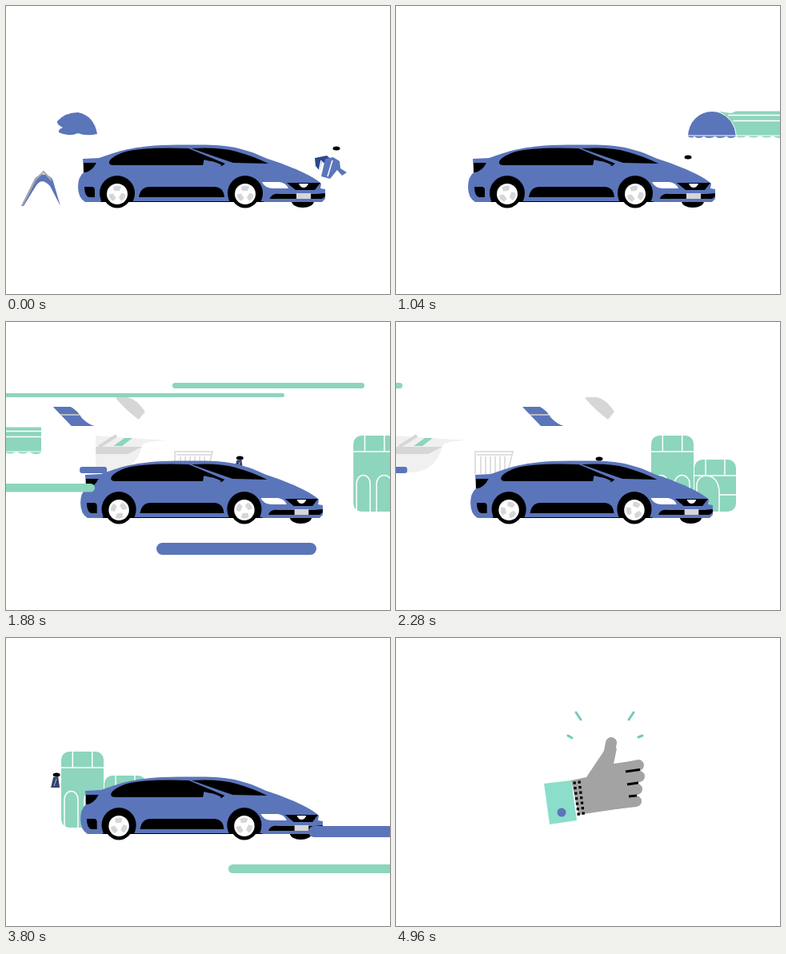
Recreate the animation shown at these times as an HTML page with a canvas. Size 480x360 px, loop 5 s.

```html
<!DOCTYPE html>
<html lang="en">
<head>
<meta charset="utf-8">
<style>
html, body { margin: 0; width: 100%; height: 100%; overflow: hidden; background: #fff; }
canvas { display: block; }
</style>
</head>
<body>
<canvas id="stage" width="480" height="360"></canvas>
<script>
const c = document.getElementById('stage').getContext('2d');
const LOOP = 5000, FRAME = 40;
const BLUE = '#5b75ba', GREEN = '#8dd5bd', MINT = '#8bdec9', SKIN = '#a3a3a3';
const GREY = '#d6d6d6', PALE = '#f0f0f0', WHITE = '#fff', BLACK = '#000';

const clamp = v => Math.max(0, Math.min(1, v));
const ease = v => v * v * (3 - 2 * v);
const mix = (a, b, k) => a + (b - a) * k;

// Linear track through time, value pairs
function track(t, ...p) {
  let i = 0;
  while (i < p.length - 4 && t > p[i + 2]) i += 2;
  return mix(p[i + 1], p[i + 3], clamp((t - p[i]) / (p[i + 2] - p[i])));
}
function fill(d, color) { c.fillStyle = color; c.fill(new Path2D(d)); }
function line(d, color, w, cap = 'butt') {
  c.strokeStyle = color; c.lineWidth = w; c.lineCap = cap; c.stroke(new Path2D(d));
}
function disc(x, y, rx, color, ry = rx) {
  c.fillStyle = color; c.beginPath(); c.ellipse(x, y, rx, ry, 0, 0, 7); c.fill();
}
function bar(x1, y1, x2, y2, color, r = (y2 - y1) / 2) {
  c.fillStyle = color; c.beginPath(); c.roundRect(x1, y1, x2 - x1, y2 - y1, r); c.fill();
}
function group(x, y, draw) { c.save(); c.translate(x, y); draw(); c.restore(); }
function clipped(x, y, w, h, draw) {
  c.save(); c.beginPath(); c.rect(x, y, w, h); c.clip(); draw(); c.restore();
}

function wheel(x, t) {
  clipped(x - 24, 205, 48, 40, () => disc(x, 234, 22, BLACK));
  disc(x, 235, 17.5, BLACK);
  disc(x, 235, 13, WHITE);
  group(x, 235, () => {
    c.rotate(t / 260);
    for (let i = 0; i < 3; i++) {
      c.rotate(Math.PI * 2 / 3);
      fill('M-4 -4L-5 -9Q0 -12 5 -9L3 -4Z', GREY);
    }
  });
}

function car(t) {
  const squeeze = track(t, 1040, 1, 1560, .98);
  c.save();
  c.translate(245, 0); c.scale(squeeze, 1); c.translate(-245, 0);
  disc(371, 244, 14, BLACK, 8);
  fill('M96 191L116 190C138 183 155 174 215 173.5H250C285 174 305 181 327 191C355 200 384 212 394 222L393 228L399 229V241L395 245H99Q90 240 90 226Q90 214 97 208Z', BLUE);
  fill('M129 195Q130 189 148 182.5Q172 176 228 178L274 197L270 200L248 192L246 199H135Q128 199 129 195Z', BLACK);
  const screen = 'M232 178Q268 176 288 182Q310 188 328 197L284 196Q260 188 232 178Z';
  fill(screen, t > 1400 && t < 1720 ? WHITE : BLACK);
  fill('M247 193Q260 193 270 199H247Z', BLUE);
  fill('M97 196H113Q108 206 99 208H97Z', BLACK);
  fill('M98 226H107Q111 226 111 230V239H104Q98 238 98 226Z', BLACK);
  fill('M166 239Q168 226 180 226H262Q272 227 273 239Z', BLACK);
  line('M118 244.5H322', BLACK, 1);
  fill('M320 220H342Q350 221 353 228H333Q323 227 320 220Z', WHITE);
  fill('M351 221H393L386 230H362Z', BLACK);
  fill('M366 222H378Q376 227 372 227Q368 227 366 222Z', WHITE);
  fill('M330 240Q333 234 342 235H388L399 234V238L395 241H330Z', BLACK);
  bar(363, 234, 381, 241, GREY, 0);
  wheel(139, t);
  wheel(299, t);
  c.restore();
}

function roadside(t) {
  group(-.173 * t, 0, () => {
    fill('M64 144Q74 133 90 133Q110 137 114 160Q100 163 90 159Q78 164 66 158Q65 154 71 152Q63 148 64 144Z', BLUE);
    fill('M19 250L36 216Q46 205 58 216L68 250L55 225Q45 214 38 224L22 250Z', BLUE);
    line('M20 250L37 217L47 207L57 218', '#aaa', 2);
  });
}

function awning(t) {
  group(track(t, 0, 575, 1560, 305, 1960, -135), 0, () => {
    fill('M10 132L24 134L30 131.5H91V163Q83 168 76 162Q68 167 60 162Q52 167 44 162Q36 167 28 162L0 150Z', GREEN);
    line('M20 136.5H91M26 143.5H91', WHITE, 1.5);
    fill('M-30 163A30 31 0 0 1 30 163Q23 167 18 163Q9 167 4 163Q-5 167 -10 163Q-17 167 -22 163Q-26 166 -30 163Z', BLUE);
    line('M8 132Q29 141 30.5 163M-30 162H91', WHITE, 1);
  });
}

function building(t) {
  group(-1.1 * (t - 1560), 0, () => {
    fill('M-60 100H80L82 107L76 112L80 150L50 155L40 138Q15 130 5 139L-60 135Z', PALE);
    line('M56 100V115M69 100V115M47 115H78V151H47ZM47 124H78M47 133H78M47 142H78M-60 100H78', GREY, 1);
  });
}

function walker(x, y, body) {
  disc(x, y, 4.5, BLACK, 2.5);
  if (body === 'run') group(x - 413, y - 178, () => {
    fill('M386 190L401 187L407 192L401 199L395 194L392 206L387 200Z', '#2c478e');
    fill('M399 191L409 189L417 194L418 203L426 208L420 212L414 205L405 216L394 213Z', BLUE);
    line('M408 193L402 213M394 193L391 208', WHITE, 1.5);
  });
  if (body === 'walk') group(x, y, () => {
    fill('M-4 3L2 2L4 16H-7Z', '#34436d');
    line('M0 5L-3 14', '#bbb', 1);
  });
}

function suitcase(x, y, w, h, details) {
  group(x, y, () => {
    bar(0, 0, w, h, GREEN, 10);
    line(`M${w * .27} 0V20M${w * .73} 0V20M0 20H${w}` + details, WHITE, 1.5);
  });
}

function airport(t) {
  group(track(t, 1720, 157, 2840, -157), 0, () => {
    fill('M0 142L58 146L91 148Q56 149 58 156Q48 188 18 188H0Z', PALE);
    fill('M0 156H58L40 165H0Z', GREY);
    line('M4 156L26 142', GREY, 4);
    fill('M22 155L36 145H46L33 155Z', GREEN);
    bar(-20, 181, 14, 189, BLUE, 3);
    line('M99 190V162H146L139 190M101 166H144M106 168V190M112 168V190M118 168V190M124 168V190M130 168V190M136 168V186', GREY, 1.5);
  });
  const x = track(t, 1720, 319, 1721, 480, 2280, 319, 3120, 181, 4280, -10, 4900, -120);
  suitcase(x, 142, 53, 95, 'M4 95V60A8 10 0 0 1 21 60V95M29 95V60A9 10 0 0 1 48 60V95');
  suitcase(x + 54, 172, 52, 65, 'M0 44H3V30Q5 20 16 20Q30 22 31 40V65M31 44H52');
}

function plane(t) {
  group(.248 * (t - 2280), 0, () => {
    fill('M158 106H180Q188 110 194 120Q202 128 210 130H181Z', BLUE);
    line('M167 116H191', '#d8d5c8', 1.5);
    group(237, 94, () => {
      const s = track(t, 2280, 1, 3120, .27);
      c.scale(s, s);
      fill('M0 0H14Q25 2 36 18L28 28Q12 16 0 2Z', GREY);
    });
  });
}

function firstRush(t) {
  group(-1.1 * (t - 1560), 0, () => {
    bar(97, 154, 346, 166.5, BLUE);
    bar(292, 89, 700, 94, GREEN);
    bar(174, 202, 463, 212.5, GREEN);
    bar(177, 201, 243, 212, WHITE);
    bar(30, 271, 109, 290, BLUE, 9);
    fill('M145 275L149 272H170V282L164 286Q158 280 148 279Z', BLUE);
    bar(70, 239, 122, 242, BLUE);
    bar(560, 76, 800, 83, GREEN);
    bar(540, 276, 740, 291, BLUE);
  });
}

function bands(shift) {
  group(shift, 0, () => {
    fill('M18 105L560 109.5V144H18A19 19.5 0 0 1 18 105Z', BLUE);
    fill('M70 142H550V188H-20V163H66Z', BLUE);
    fill('M275 185H545V235H275Z', BLUE);
    fill('M105 214H550V272L128 269A28 34 0 0 1 101 236Z', BLUE);
    bar(411, 76, 570, 109, BLUE, 15);
    bar(346, 83, 430, 90, BLUE);
    bar(460, 265, 560, 290, BLUE, 10);
    bar(-150, 235, 52, 249, BLUE);
    bar(-250, 283, 251, 294, GREEN);
  });
}

function thinStreaks(shift) {
  group(shift, 0, () => {
    bar(-20, 203, 15, 206, BLACK);
    bar(44, 203, 105, 206, BLACK);
    bar(-20, 213, 12, 216, BLUE);
    bar(70, 238, 81, 242, BLUE);
    bar(-20, 149, 47, 157, GREY);
    bar(-20, 148, 32, 155, WHITE);
    bar(26, 208, 272, 215, GREY);
    bar(26, 208, 122, 215, WHITE);
  });
}

// Every part of the hand has an open and a closed pose
const PALM = [[175,186, 190,178, 206,142, 219,143, 212,180, 225,186, 215,228, 168,232],
              [219,178, 238,174, 262,138, 276,138, 272,157, 295,154, 295,211, 228,221]];
const CUFF = [[138,179, 175,185, 167,235, 131,229], [185,182, 219,178, 226,228, 192,233]];
const FINGERS = [
  [[206,168, 214,139], [266,146, 269,131]],
  [[205,186, 270,180], [262,167, 303,159]],
  [[200,205, 284,205], [255,180, 304,173]],
  [[200,214, 276,227], [255,195, 301,189]],
  [[190,222, 258,249], [255,209, 300,204]]
];
const pose = ([a, b], k) => a.map((v, i) => mix(v, b[i], k));

function hand(t) {
  const k = ease(clamp((t - 4320) / 320));
  group(track(t, 4040, -300, 4280, 0), 0, () => {
    fill('M' + pose(CUFF, k).join(' ') + 'Z', MINT);
    fill('M' + pose(PALM, k).join(' ') + 'Z', SKIN);
    for (const f of FINGERS) {
      const [x1, y1, x2, y2] = pose(f, k);
      line(`M${x1} ${y1}L${x2} ${y2}`, SKIN, 14, 'round');
    }
    disc(mix(150, 207, k), mix(220, 218, k), 5.5, BLUE);
    for (let i = 0; i < 14; i++) {
      const row = (i >> 1) / 6, col = i % 2 * 6;
      const x = mix(mix(177, 170, row), mix(223, 228, row), k) + col;
      const y = mix(mix(187, 227, row), mix(181, 220, row), k) - col / 6;
      bar(x - 1.5, y - 1.5, x + 1.8, y + 1.8, BLACK, 0);
    }
    if (k < .3) {
      fill('M232 241Q245 236 256 244L260 251Q254 252 232 241Z', WHITE);
      disc(276, 226, 4, WHITE);
    }
    if (k > .7) line('M287 167L305 164.5M289 183L303 181M291 198L301 197', BLACK, 3);
  });
}

function sparks(t) {
  const k = clamp((t - 4680) / 160);
  if (!k) return;
  for (const [x, y, dx, dy] of [[231,102,-6,-9], [220,125,-5,-3], [291,102,6,-9], [303,124,5,-2]])
    line(`M${x} ${y}l${dx * k} ${dy * k}`, '#72cbbb', 3, 'round');
}

function draw(t) {
  c.fillStyle = WHITE;
  c.fillRect(0, 0, 480, 360);
  const shift = -1.1 * (t - 4280), edge = Math.max(0, 540 + shift);

  if (t < 700) roadside(t);
  if (t < 1960) awning(t);
  if (t > 1160 && t < 1720) building(t);
  if (t >= 1720) airport(t);
  if (t > 1640) plane(t);
  clipped(0, 0, edge, 360, () => {
    walker(track(t, 0, 413, 1040, 365, 1560, 323, 2280, 254, 3120, 149, 4300, 0),
      track(t, 0, 178, 1040, 189, 1560, 169, 2280, 171, 3120, 171),
      t < 700 ? 'run' : t > 1400 ? 'walk' : '');
    if (t > 2400) walker(track(t, 2400, 445, 3120, 363, 4300, 215),
      track(t, 2400, 200, 3120, 190, 4300, 170), 'walk');
    car(t);
  });
  if (t > 1160 && t < 2300) firstRush(t);
  if (t > 3400) {
    bands(shift);
    if (t > 4040) {
      hand(t);
      clipped(0, 188, Math.max(0, 273 + shift), 22, () => car(t));
    }
    thinStreaks(shift);
    sparks(t);
  }
}

function tick() {
  const t = performance.now() % LOOP;
  draw(Math.floor(t / FRAME) * FRAME);
  requestAnimationFrame(tick);
}
tick();
</script>
</body>
</html>
```
